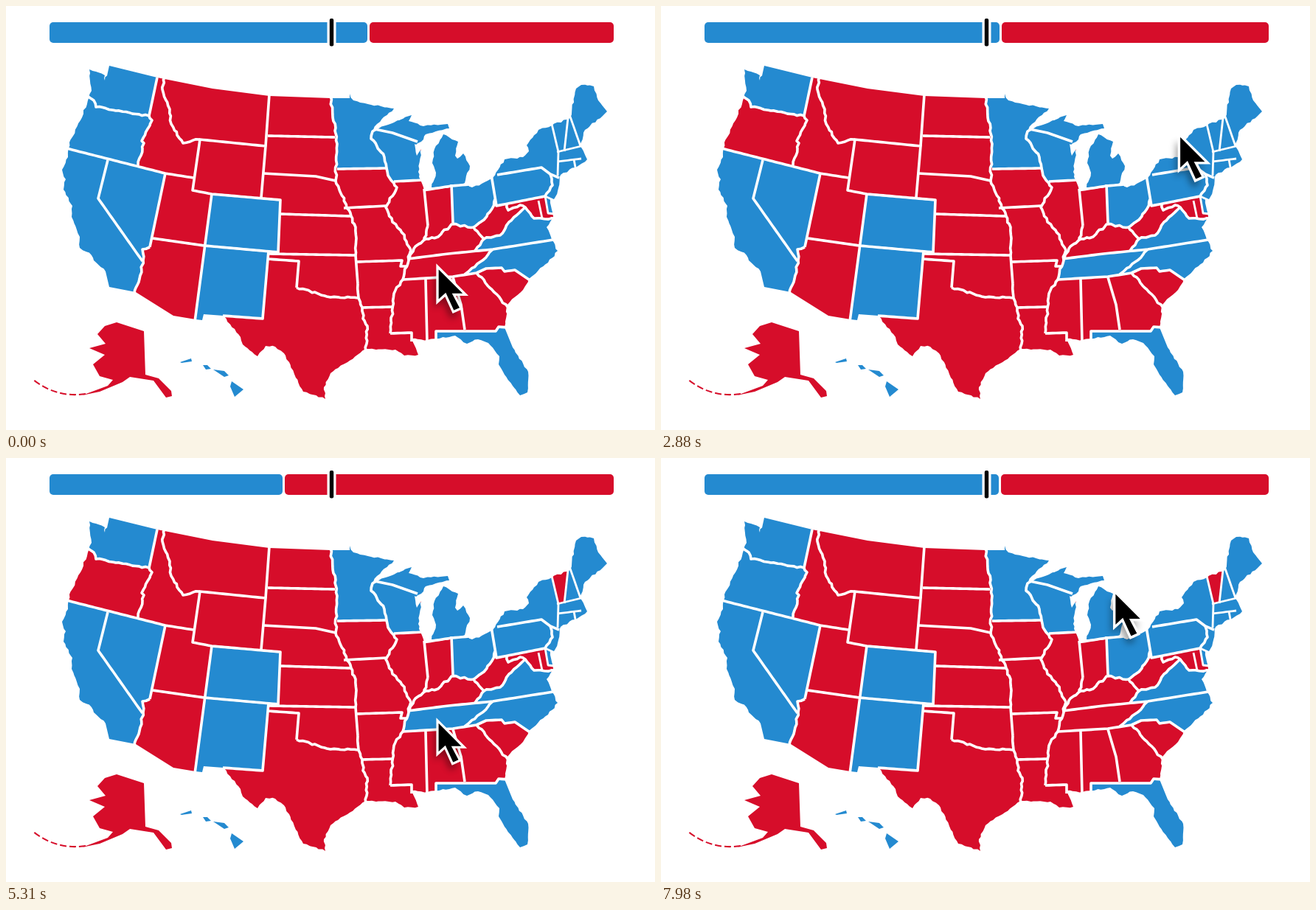
Animation of 880x575 px, one loop 8000 ms. Source, as an HTML page with a canvas:

```html
<!DOCTYPE html>
<html lang="en">
<head>
<meta charset="utf-8">
<title>Swing map</title>
<style>
html, body { margin: 0; width: 100%; height: 100%; overflow: hidden; background: #fff; }
canvas, svg { position: absolute; left: 0; top: 0; }
.red { fill: #d60d2a; }
.blue { fill: #248ad0; }
#tail { fill: none; stroke: #d60d2a; stroke-width: 2; stroke-dasharray: 9 4; }
#arrow { stroke: #fff; stroke-width: 3.4; }
</style>
</head>
<body>
<canvas id="map" width="880" height="575"></canvas>
<svg width="880" height="575">
  <defs>
    <filter id="soft" x="-60%" y="-60%" width="220%" height="220%"><feGaussianBlur stdDeviation="5"/></filter>
    <path id="pointer" d="M0 0V49L11 39 22 63 33 58 23 39H39Z"/>
  </defs>
  <rect id="left" class="blue" x="59" y="22" height="28" rx="5"/>
  <rect id="right" class="red" y="22" height="28" rx="5"/>
  <rect x="435.5" y="15" width="12" height="41" rx="4" fill="#fff"/>
  <rect x="438.8" y="17" width="5.4" height="37.5" rx="2"/>
  <path class="red" d="M150 429L187 441 189 500 207 505 224 522 225 529 217 531 200 508 168 503 158 510 127 523 103 528 138 515 145 507 127 502 118 486 134 473 113 464 135 458 124 445 134 434Z"/>
  <path id="tail" d="M108 526Q68 532 36 506"/>
  <path class="blue" d="M236 483l15-5 1 4-14 2zM267 487h6l5 5-7 1zM281 493l15 2 6 6-6 2zM306 509l16 11-12 10-6-14z"/>
  <g id="cursor">
    <use href="#pointer" transform="translate(-4 9)" opacity=".38" filter="url(#soft)"/>
    <use id="arrow" href="#pointer"/>
  </g>
</svg>
<script>
const W = 880, H = 575, LOOP = 8000;
const RED = [214, 13, 42], BLUE = [36, 138, 208];
const $ = id => document.getElementById(id);
const clamp = v => Math.min(1, Math.max(0, v));
const mix = (a, b, p) => a + (b - a) * p;
const points = text => text.match(/\d+ \d+/g).map(pair => pair.split(" ").map(Number));

let seed = 7;
const noise = () => (seed = seed * 16807 % 2147483647) / 2147483647 - .5;

// Breaks a line into short, slightly uneven steps.
function rough(line, size) {
  return line.flatMap(([x, y], i) => {
    if (!i) return [[x, y]];
    const [px, py] = line[i - 1];
    const steps = Math.max(1, Math.round(Math.hypot(x - px, y - py) / 4.5));
    return Array.from({ length: steps }, (_, k) => {
      const p = (k + 1) / steps, wobble = k + 1 < steps ? size : 0;
      return [mix(px, x, p) + noise() * wobble, mix(py, y, p) + noise() * wobble];
    });
  });
}

const northEdge = points("140 81 205 97 280 112 357 122 440 125 466 125");
const eastCoast = points(`466 119 471 128 495 134 526 139 503 160 498 168 524 172 552 181 557 203 563 194
  559 225 562 236 567 250 626 242 632 246 645 241 660 233 676 208 701 205 709 197 706 189 722 168 740 162
  765 152 773 112 780 107 797 109 803 128 815 143 785 168 778 189 788 208 777 216 752 229 748 251 743 262
  738 262 742 286 733 300 740 317 748 332 735 348 709 370 701 385 680 405 676 436`);
const southCoast = points(`687 463 708 496 707 524 697 528 676 500 668 486 669 475 654 457 640 452 625 458
  609 447 571 453 550 451 559 473 540 474 528 466 488 465 440 498 431 517 433 533 403 523 377 471 365 462
  352 461 341 475 321 459 318 449 295 420`);
const southEdge = points("268 418 266 426 257 425 227 420 176 388 140 381");
const westCoast = points(`135 360 119 345 116 338 100 328 100 313 89 286 90 271 78 249 81 235 76 222 84 205
  86 185 101 155 116 115 113 86 134 94 134 101 138 90`);
const lands = [
  [...northEdge, ...rough(eastCoast, 2), ...rough(southCoast, 2), ...southEdge, ...rough(westCoast, 2)],
  rough(points("498 168 526 158 550 148 546 156 566 163 599 160 601 166 569 174 566 181 556 188 524 174"), 2),
  rough(points("577 246 583 226 578 213 581 194 593 174 613 184 609 203 612 207 620 200 629 217 622 240 602 245"), 2)
];

const westLines = `205 97 194 149; 82 193 216 227 254 233; 138 209 125 261 185 346; 216 227 195 327;
  346 260 352 190 263 181 253 250 279 255 372 263 369 335; 357 120 352 190; 199 315 269 325 370 334;
  279 255 256 428; 356 332 348 424 294 420; 355 176 446 178; 349 227 420 231 447 237; 371 282 468 285;
  354 336 474 338 477 377; 354 343 397 346 394 382`;
const eastLines = `449 221 516 220; 458 274 515 271; 475 347 537 345 535 353 543 353; 483 409 524 408;
  521 444 550 443 550 455; 526 238 565 236; 567 248 572 298; 604 242 606 294; 500 167 524 172 558 184;
  566 250 604 244 628 242; 544 343 600 336 660 330 742 317; 538 371 606 367 638 362 651 356 672 355 676 360
  690 358 712 373; 569 371 571 456; 606 368 617 405 622 439; 583 455 583 441 664 441 668 435 680 436;
  658 229 665 271 731 258; 666 229 726 219 738 228 750 233`;
const coastLines = `740 160 749 198 748 230; 762 152 757 197; 765 150 779 190; 747 198 780 190;
  748 211 780 207; 770 208 773 224; 731 258 735 281 744 282; 731 258 744 264; 722 264 727 288`;
const rivers = `109 122 119 128 122 137 194 149 198 155 184 183 187 186 179 216;
  215 97 212 113 222 140 224 160 240 186 263 181; 195 327 185 330 186 345 181 370 174 390;
  440 123 449 187 447 237 468 285 474 300 474 338; 394 382 440 395 477 396;
  477 377 478 396 483 409 484 424 490 434 488 468;
  504 165 497 170 495 180 513 205 516 220 520 233 530 246 515 273 524 293 535 304 549 331 538 371 526 390 521 444;
  572 298 567 318; 547 343 553 329 566 318 586 313 604 296 634 300 648 290 659 275 663 262;
  660 330 643 347 622 364; 634 300 648 316 636 332; 638 362 680 408;
  648 316 670 311 682 293 704 273 697 270 681 277 679 269; 738 228 741 243 731 258; 704 273 716 288 744 288`;

const ctx = $("map").getContext("2d", { willReadFrequently: true });
function trace(line) {
  ctx.beginPath();
  line.forEach(p => ctx.lineTo(...p));
}
function carve(text, width, size) {
  ctx.lineWidth = width;
  text.split(";").forEach(line => {
    trace(rough(points(line), size));
    ctx.stroke();
  });
}

ctx.fillStyle = `rgb(${RED})`;
lands.forEach(land => { trace(land); ctx.fill(); });
ctx.globalCompositeOperation = "destination-out";
ctx.lineJoin = "round";
carve(westLines, 3.6, 0);
carve(eastLines, 3.6, 0);
carve(coastLines, 2.8, 0);
carve(rivers, 3.6, 2.5);
const picture = ctx.getImageData(0, 0, W, H);

// Collects the pixels of one state, soft edges included.
function region([x, y]) {
  const seen = new Set([y * W + x]);
  for (const i of seen) {
    if (picture.data[i * 4 + 3] < 90) continue;
    [i - 1, i + 1, i - W, i + W].forEach(n => seen.add(n));
  }
  return [...seen];
}
function paint(cells, color) {
  cells.forEach(i => picture.data.set(color, i * 4));
}

points(`160 115 110 270 170 250 320 295 300 380 475 180 530 205 570 167 600 215 630 270 690 310 700 345
  690 480 715 200 766 182 785 140 760 204 759 217 743 248 738 272`).forEach(p => paint(region(p), BLUE));

const swingStates = [
  { cells: region([590, 352]), isBlue: t => t >= 70 && t < 5370 },
  { cells: region([140, 170]), isBlue: t => t < 2110 || t >= 7310 },
  { cells: region([751, 175]), isBlue: t => t < 3740 }
];

// start, end, x, y, sag of the path
const moves = [
  [233, 1436, 136, 181, 0], [2271, 3103, 749, 170, 13], [3912, 4762, 585, 352, 0],
  [5530, 6735, 136, 181, 0], [7465, 8297, 749, 170, 13]
];
const presses = [-80, 2030, 3680, 5310, 7240];
// start, end, edge of the blue bar
const swings = [
  [70, 400, 519], [2110, 2420, 459], [3740, 4000, 371], [4000, 4200, 375],
  [5370, 5660, 350], [5660, 5950, 361], [7280, 7940, 458]
];
const inOut = p => p < .5 ? 4 * p ** 3 : 1 - 4 * (1 - p) ** 3;
const out = p => 1 - (1 - p) ** 3;

function cursorAt(t) {
  let x = 585, y = 352;
  for (const [start, end, toX, toY, sag] of moves) {
    const p = inOut(clamp((t - start) / (end - start)));
    x = mix(x, toX, p);
    y = mix(y, toY, p) + sag * Math.sin(Math.PI * p);
  }
  return [x, y];
}

let shown = "";
function drawMap(t) {
  const flags = swingStates.map(s => s.isBlue(t));
  if (shown === flags.join()) return;
  shown = flags.join();
  swingStates.forEach((s, i) => paint(s.cells, flags[i] ? BLUE : RED));
  ctx.putImageData(picture, 0, 0);
}

function draw(t) {
  drawMap(t);
  const edge = swings.reduce((e, [start, end, to]) => mix(e, to, out(clamp((t - start) / (end - start)))), 490);
  $("left").setAttribute("width", edge - 59);
  $("right").setAttribute("x", edge + 3);
  $("right").setAttribute("width", 821 - edge);

  const [x, y] = cursorAt(t);
  const press = Math.max(...presses.map(c => clamp(1 - Math.abs(t - c) / 120)));
  $("cursor").setAttribute("transform", `translate(${x} ${y + 4 * press}) scale(${1 - .07 * press})`);
}

function tick() {
  draw(performance.now() % LOOP);
  requestAnimationFrame(tick);
}
tick();
</script>
</body>
</html>
```
